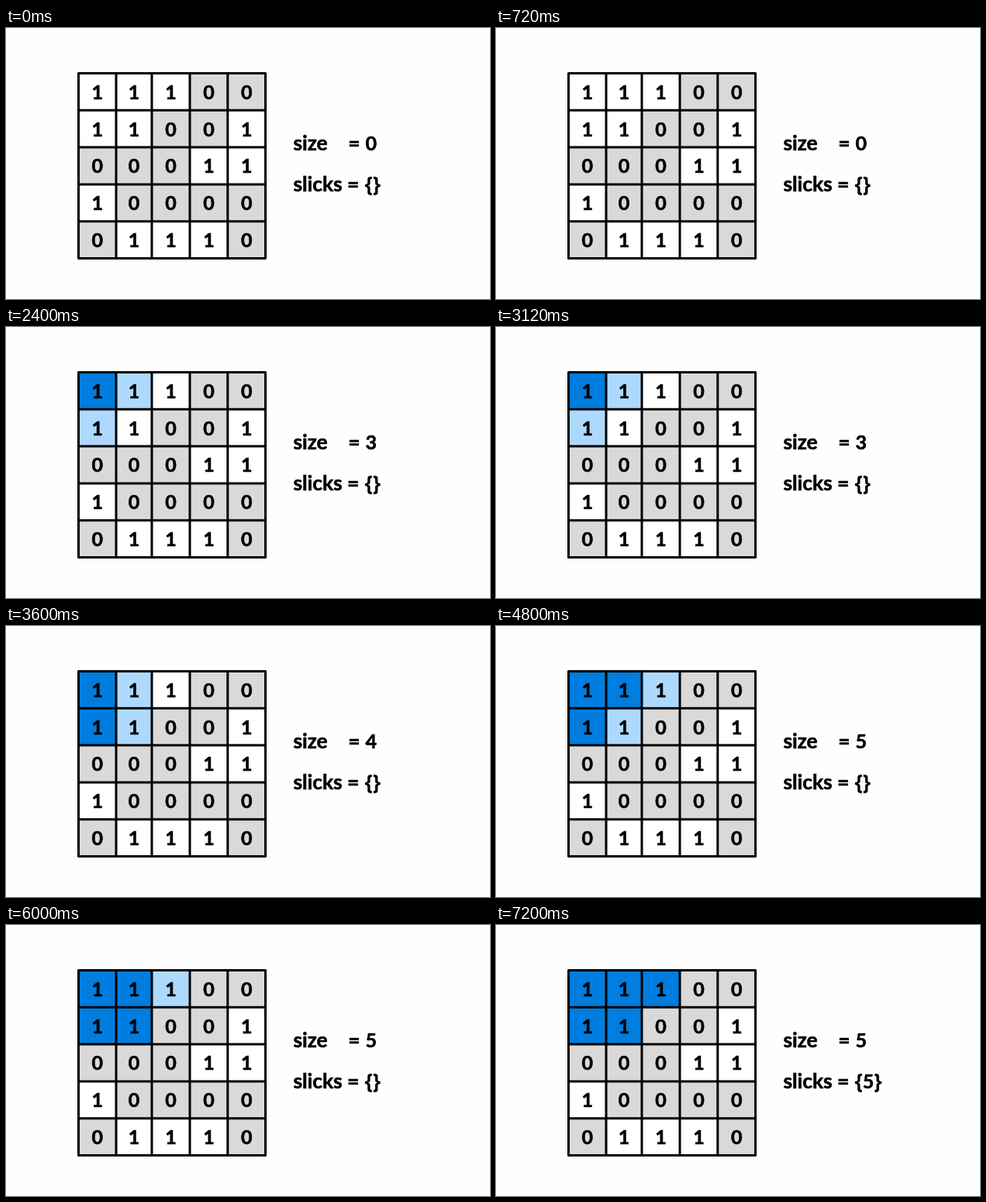
An HTML page for the animation above (8000 ms loop, 624 by 350 pixels).

```html
<!DOCTYPE html>
<html lang="en">
<head>
<meta charset="utf-8">
<title>Slick sizes</title>
<style>
  html, body { margin: 0; width: 100%; height: 100%; overflow: hidden; background: #fefefe; }
  svg { display: block; width: 624px; height: 350px; }
  text { font: bold 25px Lato, sans-serif; fill: #000; stroke: #000; stroke-width: 0.6; }
  .digit { text-anchor: middle; }
  .word { font-size: 26.3px; }
  .brace { font: bold 26px "Open Sans", sans-serif; stroke: none; }
</style>
</head>
<body>
<svg id="stage" viewBox="0 0 624 350"></svg>
<script>
const stage = document.getElementById('stage');
const LOOP = 8000, STEP = 1200;
const grid = ['11100', '11001', '00011', '10000', '01110'];
const xs = [93.5, 142, 188, 237, 285.8, 334.5];
const ys = xs.map((_, i) => 58.5 + 47.8 * i);
const color = { land: '#d9d9d9', oil: '#ffffff', queued: '#aed9ff', done: '#007dde' };

// Cells are named by row and column.
const steps = [
  { queued: [], done: [], size: 0, slicks: '' },
  { queued: ['00'], done: [], size: 1, slicks: '' },
  { queued: ['01', '10'], done: ['00'], size: 3, slicks: '' },
  { queued: ['01', '11'], done: ['00', '10'], size: 4, slicks: '' },
  { queued: ['02', '11'], done: ['00', '10', '01'], size: 5, slicks: '' },
  { queued: ['02'], done: ['00', '10', '01', '11'], size: 5, slicks: '' },
  { queued: [], done: ['00', '10', '01', '11', '02'], size: 5, slicks: '5' }
];

function add(tag, attrs, content = '', parent = stage) {
  const el = document.createElementNS('http://www.w3.org/2000/svg', tag);
  for (const key in attrs) el.setAttribute(key, attrs[key]);
  el.textContent = content;
  return parent.appendChild(el);
}

const word = (x, y, content) => add('text', { class: 'word', x, y }, content);

const cells = [];
grid.forEach((line, r) => [...line].forEach((value, c) => {
  const rect = add('rect', {
    x: xs[c], y: ys[r], width: xs[c + 1] - xs[c], height: ys[r + 1] - ys[r]
  });
  cells.push({ id: `${r}${c}`, value, rect });
  add('text', {
    class: 'digit', x: (xs[c] + xs[c + 1]) / 2, y: (ys[r] + ys[r + 1]) / 2 + 9.4
  }, value);
}));

add('path', {
  d: xs.map(x => `M${x} ${ys[0]}V${ys[5]}`).join('')
    + ys.map(y => `M${xs[0]} ${y}H${xs[5]}`).join(''),
  stroke: '#000', 'stroke-width': 3, 'stroke-linecap': 'round', fill: 'none'
});

word(370.5, 158, 'size');
word(441.3, 158, '=');
word(370.5, 211, 'slicks');
word(440, 211, '=');
const sizeText = add('text', { x: 463.5, y: 158 });
const list = add('text', { x: 462.5, y: 211 });
add('tspan', { class: 'brace' }, '{', list);
const slickText = add('tspan', {}, '', list);
add('tspan', { class: 'brace' }, '}', list);

let shown = -1;

function draw(time) {
  const index = Math.floor((time % LOOP) / STEP);
  if (index === shown) return;
  shown = index;
  const step = steps[index];
  for (const { id, value, rect } of cells) {
    const state = step.done.includes(id) ? 'done'
      : step.queued.includes(id) ? 'queued'
      : value === '1' ? 'oil' : 'land';
    rect.setAttribute('fill', color[state]);
  }
  sizeText.textContent = step.size;
  slickText.textContent = step.slicks;
}

const start = performance.now();
function tick() {
  draw(performance.now() - start);
  requestAnimationFrame(tick);
}
tick();
</script>
</body>
</html>
```
